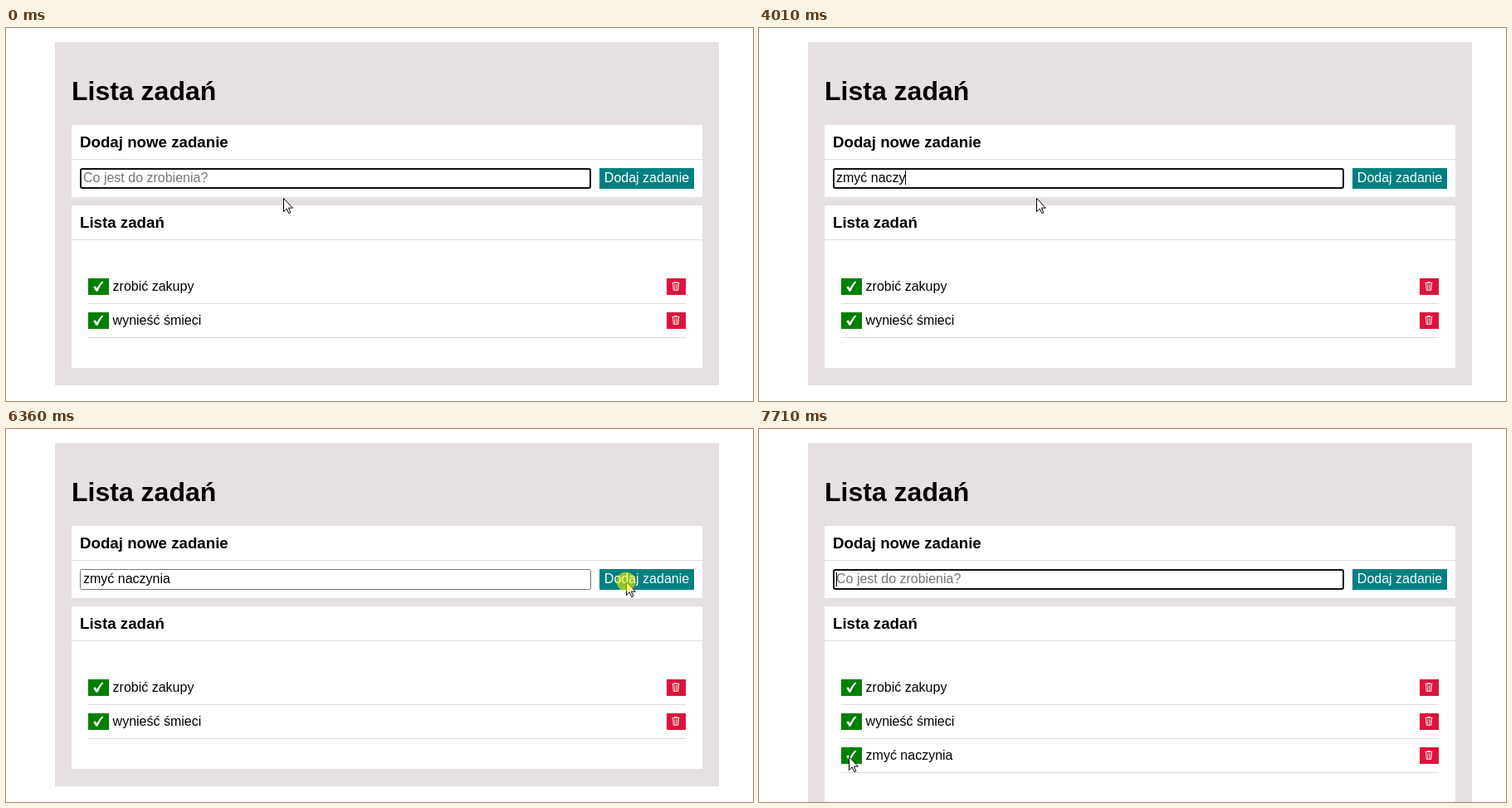
An HTML page that plays this animation: 900x450 px, repeating every 8000 ms.

```html
<!DOCTYPE html>
<html lang="pl">
<head>
<meta charset="utf-8">
<title>Lista zadań</title>
<style>
  html, body { margin: 0; width: 100%; height: 100%; overflow: hidden; background: #fff; }
  svg { display: block; font: 16px "Liberation Sans", Arial, sans-serif; }
  h1, .title { font-weight: bold; }
  .title { font-size: 32px; }
  .heading { font-size: 18.72px; font-weight: bold; }
  .panel { fill: #fff; }
  .line { fill: #ddd; }
</style>
</head>
<body>
<svg width="900" height="450" viewBox="0 0 900 450">
  <defs>
    <g id="task">
      <rect x="99" y="302" width="25" height="20" fill="green"/>
      <path d="M105.3 312.8l2.1-1.5 2.2 2.7c1.6-3.1 3.6-5.8 6-8.2l1.9.5c-2.9 3.2-5.1 6.8-6.7 11l-2 .6z" fill="#fff"/>
      <rect x="796" y="302" width="23" height="20" fill="crimson"/>
      <g fill="none" stroke="#f3dfd6">
        <path d="M802.5 307.5h9M805 306.5h4M803.5 308l.7 8.5h5.6l.7-8.5"/>
        <path d="M805.5 309v7M807.5 309v7M809.2 309v7" stroke-width=".8"/>
      </g>
      <rect class="line" x="99" y="332" width="720" height="1"/>
    </g>
  </defs>

  <rect id="page" x="59" y="17" width="800" fill="#e6e0e0"/>
  <text class="title" x="79" y="87">Lista zadań</text>

  <rect class="panel" x="79" y="117" width="760" height="87"/>
  <text class="heading" x="89" y="144">Dodaj nowe zadanie</text>
  <rect class="line" x="79" y="158" width="760" height="1"/>
  <rect id="blurred" x="89.5" y="169.5" width="615" height="24" rx="2" fill="none" stroke="#767676"/>
  <rect id="focused" x="90" y="170" width="614" height="23" rx="2" fill="none" stroke="#101010" stroke-width="2"/>
  <text id="placeholder" x="93" y="186" fill="#757575">Co jest do zrobienia?</text>
  <text id="typed" x="93" y="186" style="white-space:pre"></text>
  <rect id="caret" width="1" height="17"/>
  <rect x="715" y="169" width="114" height="25" fill="teal"/>
  <text x="720.86" y="186" fill="#fff">Dodaj zadanie</text>

  <rect id="list" class="panel" x="79" y="214" width="760"/>
  <text class="heading" x="89" y="241">Lista zadań</text>
  <rect class="line" x="79" y="255" width="760" height="1"/>
  <use href="#task"/>
  <text x="128.6" y="317">zrobić zakupy</text>
  <use href="#task" y="41"/>
  <text x="128.6" y="358">wynieść śmieci</text>
  <g id="added">
    <use href="#task" y="82"/>
    <text x="128.6" y="399">zmyć naczynia</text>
  </g>

  <path id="cursor" d="M.5.5v16l3.7-3.5 2.6 5.6 2.1-.9-2.5-5.6h5z" fill="#fff" stroke="#000"/>
  <circle id="click" cx="747" cy="184" r="11.5" fill="#ff0" fill-opacity=".55"/>
</svg>
<script>
const LOOP = 8000, BLINK = 525, PRESS = 6220, SUBMIT = 6420;
const $ = id => document.getElementById(id);
const show = (id, on) => $(id).setAttribute('visibility', on ? 'visible' : 'hidden');

// [time, field content]; each edit also restarts the caret blink
const edits = [
  [-580, ''], [1120, 'z'], [1330, 'zm'], [1580, 'zmy'], [1990, 'zmyć'], [2250, 'zmyć '],
  [2470, 'zmyć n'], [2600, 'zmyć na'], [2930, 'zmyć nac'], [3130, 'zmyć nacy'], [3220, 'zmyć nacy'],
  [3740, 'zmyć nac'], [3880, 'zmyć nacz'], [4010, 'zmyć naczy'],
  [4410, 'zmyć naczyn'], [4500, 'zmyć naczyni'], [4600, 'zmyć naczynia'], [SUBMIT, '']
];

// [time, x, y] of the pointer tip, held until the next entry
const pointer = [
  [0, 334, 205], [5400, 357, 200], [5470, 432, 204], [5540, 540, 209], [5610, 648, 211], [5680, 714, 211],
  [5880, 721, 206], [5950, 731, 197], [6020, 741, 189], [6090, 746, 185], [6150, 747, 184],
  [SUBMIT, 748, 184], [6560, 748, 183]
];
const STEPS = 12;
for (let i = 1; i <= STEPS; i++) {
  const p = i / STEPS, e = p * p * (3 - 2 * p);
  pointer.push([6760 + (i - 1) * 68, Math.round(748 - 641 * e), Math.round(183 + 212 * e)]);
}
pointer.push([7710, 108, 395]);

const latest = (track, t) => track.findLast(entry => entry[0] <= t);

function draw(t) {
  const [since, text] = latest(edits, t);
  const [, x, y] = latest(pointer, t);
  const pressed = t >= PRESS && t < SUBMIT;
  const submitted = t >= SUBMIT;
  const grow = submitted ? 41 : 0;

  $('typed').textContent = text;
  show('placeholder', !text);
  show('focused', !pressed);
  show('blurred', pressed);
  show('click', pressed);
  show('added', submitted);

  show('caret', !pressed && Math.floor((t - since) / BLINK) % 2 === 0);
  const width = text ? $('typed').getComputedTextLength() : 0;
  $('caret').setAttribute('x', Math.floor(93 + width));
  $('caret').setAttribute('y', text ? 172 : 173);

  $('page').setAttribute('height', 414 + grow);
  $('list').setAttribute('height', 196 + grow);
  $('cursor').setAttribute('transform', `translate(${x} ${y})`);
}

const start = performance.now();
function tick() {
  draw((performance.now() - start) % LOOP);
  requestAnimationFrame(tick);
}
tick();
</script>
</body>
</html>
```
